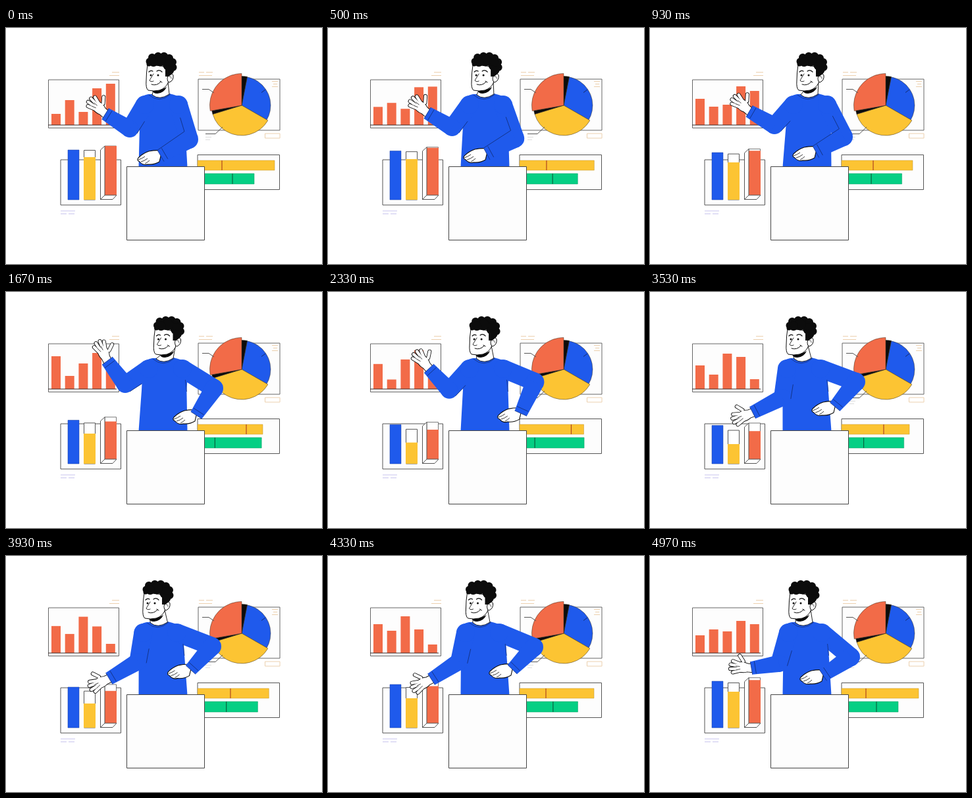
An HTML page with a canvas for the animation above (5 s loop, 480 by 360 pixels).

```html
<!DOCTYPE html>
<html lang="en">
<head>
<meta charset="utf-8">
<title>Presenter with charts</title>
<style>
  html, body { margin: 0; width: 100%; height: 100%; overflow: hidden; background: #fff; }
  canvas { display: block; width: 480px; height: 360px; }
</style>
</head>
<body>
<canvas id="stage" width="480" height="360"></canvas>
<script>
const ctx = document.getElementById('stage').getContext('2d');
const LOOP = 5000;
const BLUE = '#1f5aec', RED = '#f26b48', YELLOW = '#fcc433', GREEN = '#05cf84';
const INK = '#0c0c0c', LINE = '#555', SEAM = '#12307f', TAN = '#ecd0ae', CARD = '#fdfdfd';

// Key times and the value of each channel at those times
const times = [0, 930, 1670, 2930, 3530, 4330, 4970];
const tracks = {
  head:   [0, 10, 11.5, -6, -6, -3.5, -2],
  body:   [0, 7, 6, 1, -3, -2, -1],
  elbowLX: [188, 189, 181, 190, 201, 199, 196],
  elbowLY: [154, 149, 141, 159, 161, 161, 164],
  cuffLX: [151, 151, 154, 153, 156, 157, 154],
  cuffLY: [131, 127, 105, 139, 184, 188, 171],
  hand:   [222, 221, 244, 204, 159, 153, 185],
  elbowRX: [278, 294, 316, 313, 313, 313, 305],
  elbowRY: [170, 166, 147, 133, 137, 139, 154],
  cuffRX: [235, 252, 289, 294, 281, 280, 263],
  cuffRY: [195, 189, 188, 181, 175, 173, 182],
  bar0: [131, 108, 98, 120, 112, 104, 121],
  bar1: [110, 120, 128, 136, 126, 114, 112],
  bar2: [128, 117, 109, 98, 94, 92, 115],
  bar3: [92, 89, 93, 85, 99, 112, 99],
  bar4: [85, 96, 108, 142, 133, 135, 104],
  level: [197, 205, 216, 237, 232, 217, 207],
  end:   [408, 399, 390, 388, 394, 404, 408],
  tick:  [328, 339, 365, 371, 355, 331, 328]
};

// Smooth curve through the keys, flat at turning points
function slope(v, i) {
  if (i === 0 || i === v.length - 1) return 0;
  const a = (v[i] - v[i - 1]) / (times[i] - times[i - 1]);
  const b = (v[i + 1] - v[i]) / (times[i + 1] - times[i]);
  return a * b <= 0 ? 0 : 2 * a * b / (a + b);
}
function sample(v, t) {
  const last = times.length - 1;
  if (t >= times[last]) return v[last];
  let i = 0;
  while (t >= times[i + 1]) i++;
  const span = times[i + 1] - times[i], u = (t - times[i]) / span, w = 1 - u;
  return v[i] * (1 + 2 * u) * w * w + slope(v, i) * span * u * w * w
    + v[i + 1] * u * u * (3 - 2 * u) - slope(v, i + 1) * span * u * u * w;
}
function poseAt(t) {
  const p = {};
  for (const key in tracks) p[key] = sample(tracks[key], t);
  return p;
}

function paint(fill, stroke, width = 1) {
  if (fill) { ctx.fillStyle = fill; ctx.fill(); }
  if (stroke) { ctx.strokeStyle = stroke; ctx.lineWidth = width; ctx.stroke(); }
}
function box(x1, y1, x2, y2, fill, stroke, width) {
  ctx.beginPath();
  ctx.rect(x1, y1, x2 - x1, y2 - y1);
  paint(fill, stroke, width);
}
function line(points, color = LINE, width = 1) {
  ctx.beginPath();
  points.forEach(([x, y]) => ctx.lineTo(x, y));
  paint(null, color, width);
}
function poly(points, fill, stroke) {
  ctx.beginPath();
  points.forEach(([x, y]) => ctx.lineTo(x, y));
  ctx.closePath();
  paint(fill, stroke);
}
function shape(d, fill, stroke, width) {
  const path = new Path2D(d);
  if (fill) { ctx.fillStyle = fill; ctx.fill(path); }
  if (stroke) { ctx.strokeStyle = stroke; ctx.lineWidth = width || 1; ctx.stroke(path); }
}
function dot(x, y, r, fill) {
  ctx.beginPath();
  ctx.arc(x, y, r, 0, Math.PI * 2);
  paint(fill);
}
function dash(x1, x2, y, color = TAN) { line([[x1, y], [x2, y]], color); }

function barChart(p) {
  box(64.5, 79, 171.5, 152.5, CARD, LINE, 0.9);
  for (let i = 0; i < 5; i++) {
    const x = 69 + i * 20.7;
    box(x, p['bar' + i], x + 14, 148, RED);
  }
  dash(64, 168, 148, '#3a2a28');
  dash(161, 172, 67.5);
  dash(157, 172, 72.5);
}

function wedge(from, to, r, fill) {
  const rad = Math.PI / 180;
  ctx.beginPath();
  ctx.moveTo(358, 118);
  ctx.arc(358, 118, r, from * rad, to * rad);
  ctx.closePath();
  paint(fill, '#3b3020', 0.5);
}
function pieChart() {
  box(292, 78, 416, 156, CARD, LINE, 0.9);
  wedge(-79, 30, 44, BLUE);
  wedge(30, 163, 46, YELLOW);
  wedge(163, 170, 46, INK);
  wedge(270, 281, 44.5, INK);
  wedge(170, 270, 48.5, RED);
  line([[388, 98.5], [394, 94]], '#142c70');
  line([[298, 93.5], [308, 93.5], [316, 99]]);
  line([[303, 161.5], [318, 161.5], [329, 151]]);
  dash(293, 301, 67.5);
  dash(304, 314, 67.5);
  dash(293, 313, 72.5);
  dash(404, 413, 81.5);
  dash(406, 412, 85.5);
  dash(404, 413, 89.5);
  dash(303, 312, 166.5, '#ddd');
  dash(303, 310, 170.5, '#ddd');
  box(393.5, 161, 416, 168, null, TAN);
}

function columns(p) {
  const at = (top, rate) => top + (p.level - 197) * rate;
  box(83, 201, 174.5, 270, CARD, LINE);
  box(94, at(186, 0.5), 111, 262, BLUE, '#1b3fa0', 0.5);
  box(118.5, at(186.5, 0.7), 135.5, 262, '#fff', LINE);
  box(118, p.level, 136, 262, YELLOW);
  const top = at(180, 0.57);
  box(150, top, 167.5, 255, '#fff', LINE, 0.8);
  box(150, at(180, 0.92), 168, 255, RED);
  poly([[143.5, top + 6], [150, top], [150, 255], [143.5, 261.5]], '#fff', LINE);
  poly([[143.5, 261.5], [150, 255], [168, 255], [162, 261.5]], '#fff', LINE);
  dash(83, 105, 279, '#c9c5ee');
  dash(83, 92, 283.5, '#c9c5ee');
  dash(95, 104, 283.5, '#c9c5ee');
}

function progress(p) {
  box(291, 193.5, 415.5, 246.5, CARD, LINE);
  box(291, 202, p.end, 217, YELLOW, '#c09430', 0.5);
  line([[p.tick, 202], [p.tick, 217]], '#b0451f', 1.2);
  box(301, 222, 377 + (408 - p.end) * 0.62, 238, GREEN, '#0a9963', 0.5);
  const x = 344 - (p.tick - 328) * 0.72;
  line([[x, 222], [x, 238]], '#07633f', 1.2);
}

// Point beside a, square to the direction a-b
function beside(a, b, dist) {
  const dx = b[0] - a[0], dy = b[1] - a[1], len = Math.hypot(dx, dy);
  return [a[0] - dy / len * dist, a[1] + dx / len * dist];
}
function limb(a, b, ra, rb) {
  poly([beside(a, b, ra), beside(b, a, -rb), beside(b, a, rb), beside(a, b, -ra)], BLUE);
}
function arm(shoulder, elbow, cuff, w) {
  limb(shoulder, elbow, 14, w);
  dot(...shoulder, 14, BLUE);
  dot(...elbow, w, BLUE);
  limb(elbow, cuff, w, 10);
  const mix = (k) => [cuff[0] + (elbow[0] - cuff[0]) * k, cuff[1] + (elbow[1] - cuff[1]) * k];
  const band = mix(0.14);
  line([beside(band, elbow, 9.5), beside(band, elbow, -9.5)], SEAM, 0.9);
  line([beside(cuff, elbow, 10), beside(cuff, elbow, -10)], SEAM, 0.8);
}
function crease(from, shoulder, elbow, k) {
  return [from[0] + (shoulder[0] - elbow[0]) * k, from[1] + (shoulder[1] - elbow[1]) * k];
}

function openHand(x, y, degrees) {
  ctx.save();
  ctx.translate(x, y);
  ctx.rotate(degrees * Math.PI / 180);
  ctx.lineCap = 'round';
  const fingers = [[-18, 31], [-7, 34], [5, 34], [16, 32], [42, 28]].map(([a, r]) => {
    const u = a * Math.PI / 180;
    return [[13, a * 0.22], [Math.cos(u) * (r - 2), Math.sin(u) * (r - 2)]];
  });
  const palm = 'M-3 -6 L6 -6 Q14 -9 20 -6 Q23 0 19 7 Q13 9 6 6 L-3 6 Z';
  shape(palm, null, INK, 1.8);
  fingers.forEach(f => line(f, INK, 6));
  fingers.forEach(f => line(f, '#fff', 4.3));
  shape(palm, '#fff');
  line([[17, -3], [23, -5]], INK, 0.7);
  line([[18, 1], [24, 1]], INK, 0.7);
  ctx.restore();
}

function restingHand(x, y) {
  ctx.save();
  ctx.translate(x, y);
  shape('M2 -8 Q-8 -9 -18 -7 Q-27 -4 -34 3 Q-37 7 -32 9 Q-27 15 -20 13 Q-10 14 -2 9 Z', '#fff', INK, 1.1);
  shape('M-34 6 Q-28 4 -24 1 M-30 9 Q-25 8 -20 4 M-24 12 Q-20 10 -17 7', null, INK, 0.8);
  ctx.restore();
}

function torso(b) {
  shape(`M${216 + b} 101 Q${206 + b} 103 ${202 + b} 109 L${203 + b * 0.5} 150 L201.5 212
    L275.5 212 L${272 + b * 0.4} 150 L${271 + b} 109 Q${262 + b} 103 ${248 + b} 100 Z`, BLUE);
}

function neck(h, b) {
  shape(`M${223 + h} 90 L${222 + b} 102 Q${233 + b} 111 ${248 + b} 101 L${246 + h} 80 Z`, '#fff');
  shape(`M${223.5 + h} 96 L${222 + b} 102 Q${233 + b} 111 ${248 + b} 101 L${246 + h} 82`, null, INK, 0.9);
  shape(`M${217 + b} 102 Q${233 + b} 116 ${250 + b} 101`, null, SEAM, 0.8);
}

function head(h) {
  ctx.save();
  ctx.translate(h, 0);
  ctx.lineCap = 'round';
  shape('M222 95 Q232 97 244 90 Q240 99 230 100 Q223 100 222 95 Z', INK);
  shape('M215 56 Q213 68 213 80 Q212 92 216 95 Q224 97 233 95 Q242 92 246 84 L250 60 Z', '#fff', INK, 1);
  shape('M246 72 Q251 67 254 72 Q255 80 248 83 Q245 82 245 78 Z', '#fff', INK, 1);
  shape('M248 74 Q251 73 251 77', null, INK, 0.7);
  const curls = [[218, 51, 5.5], [222, 45, 6], [231, 43, 6], [240, 43.5, 6.5], [248, 46, 6],
    [253, 52, 6], [254, 60, 5.5], [247, 56, 9], [234, 50, 8.5], [224, 52, 7], [217, 55, 3.5]];
  curls.forEach(c => dot(...c, INK));
  shape('M238 56 L256 60 Q256 68 251 71 L247 74 L242 74 L242 62 Z', INK);
  shape('M217 67 Q220 64 223 66 M229 66 Q233 63 237 67', null, INK, 1.2);
  dot(220, 72, 1.5, INK);
  dot(231, 72, 1.5, INK);
  shape('M224 70 Q219 78 218 80 Q220 83 224 81', null, INK, 0.9);
  shape('M221 86 Q229 89 235 82 M234 81 L237 83', null, INK, 1);
  ctx.restore();
}

function presenter(p) {
  const shoulderL = [211 + p.body, 117], shoulderR = [262 + p.body, 117];
  const elbowL = [p.elbowLX, p.elbowLY], elbowR = [p.elbowRX, p.elbowRY];
  const cuffL = [p.cuffLX, p.cuffLY], cuffR = [p.cuffRX, p.cuffRY];

  openHand(...cuffL, p.hand);
  torso(p.body);
  arm(shoulderL, elbowL, cuffL, 13);
  const back = beside(elbowL, shoulderL, 13);
  line([back, crease(back, shoulderL, elbowL, 0.5)], SEAM, 0.9);

  neck(p.head, p.body);
  head(p.head);

  restingHand(...cuffR);
  arm(shoulderR, elbowR, cuffR, 14);
  const bend = beside(elbowR, cuffR, 14);
  // The fold shows only while the forearm lies across the body
  if (p.elbowRX < 304) {
    line([beside(cuffR, elbowR, -10), bend, crease(bend, shoulderR, elbowR, 0.4)], SEAM, 0.9);
  } else {
    line([[270 + p.body * 0.4, 134], [272 + p.body * 0.4, 152]], SEAM, 0.8);
  }
}

function draw(t) {
  ctx.fillStyle = '#fff';
  ctx.fillRect(0, 0, 480, 360);
  const p = poseAt(t);
  barChart(p);
  pieChart();
  columns(p);
  progress(p);
  presenter(p);
  box(183.5, 211.5, 301.5, 323.5, CARD, '#444');
}

const start = performance.now();
function tick() {
  draw((performance.now() - start) % LOOP);
  requestAnimationFrame(tick);
}
tick();
</script>
</body>
</html>
```
